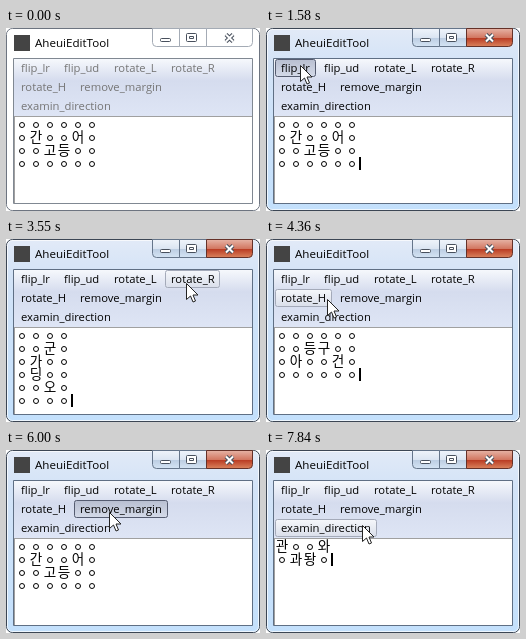
An HTML page with a canvas that plays this animation: 254 px wide and 183 px high, repeating every 7.94 s.

```html
<!DOCTYPE html>
<html lang="ko">
<head>
<meta charset="utf-8">
<title>AheuiEditTool</title>
<style>
html, body { margin: 0; width: 100%; height: 100%; overflow: hidden; background: #fff; }
canvas { display: block; }
</style>
</head>
<body>
<canvas id="stage" width="254" height="183"></canvas>
<script>
const ctx = document.getElementById('stage').getContext('2d');
const LOOP = 7940, STEP = 100, ACTIVATE = 1280, FIRST_PRESS = 1580;
const UI = '"Open Sans", "Noto Sans", sans-serif';
const MENU_FONT = `11.25px ${UI}`;

// Replaces the vowel of a Hangul syllable; single letters stay as they are.
function setVowel(ch, change) {
  const n = ch.charCodeAt(0) - 0xAC00;
  if (n < 0) return ch;
  const v = Math.floor(n / 28) % 21;
  return String.fromCharCode(0xAC00 + n + (change(v) - v) * 28);
}
const vowels = (rows, change) => rows.map(row => [...row].map(ch => setVowel(ch, change)).join(''));
const swap = (a, b) => v => v === a ? b : v === b ? a : v;

// Vowel indices: ㅏ 0, ㅓ 4, ㅗ 8, ㅘ 9, ㅜ 13, ㅡ 18, ㅣ 20
const quarter = { 0: 8, 8: 4, 4: 13, 13: 0, 18: 20, 20: 18 };
const flipLR = rows => vowels(rows.map(row => [...row].reverse().join('')), swap(0, 4));
const flipUD = rows => vowels([...rows].reverse(), swap(8, 13));
const rotateL = rows => vowels(
  [...rows[0]].map((_, c) => rows.map(row => row[c]).join('')).reverse(), v => quarter[v] ?? v);
const rotateR = rows => rotateL(rotateL(rotateL(rows)));
const rotateH = rows => flipUD(flipLR(rows));
const removeMargin = rows => rows.slice(1, -1).map(row => row.slice(1, -1));
const examine = rows => vowels(rows, () => 9);

const blank = 'ㅇㅇㅇㅇㅇㅇ';
const start = [blank, 'ㅇ간ㅇㅇ어ㅇ', 'ㅇㅇ고등ㅇㅇ', blank];

// Buttons in the order they are clicked; aim is the pointer tip.
const buttons = [
  { label: 'flip_lr', edit: flipLR, press: FIRST_PRESS, aim: [34, 37] },
  { label: 'flip_ud', edit: flipUD, press: 2470, aim: [74, 39] },
  { label: 'rotate_L', edit: rotateL, press: 3350, aim: [109, 38] },
  { label: 'rotate_R', edit: rotateR, press: 4160, aim: [190, 45] },
  { label: 'rotate_H', edit: rotateH, press: 5030, aim: [43, 62] },
  { label: 'remove_margin', edit: removeMargin, press: 6000, aim: [103, 62] },
  { label: 'examin_direction', edit: examine, press: 6900, aim: [96, 75] }
];

function layOut() {
  ctx.font = MENU_FONT;
  let x = 15, top = 31;
  for (const b of buttons) {
    const w = ctx.measureText(b.label).width;
    if (x + w > 246) { x = 15; top += 19; }
    Object.assign(b, { x: Math.round(x), top, left: Math.round(x) - 6, right: Math.round(x + w + 6) });
    x += w + 14.3;
  }
}

function pointerAt(t) {
  let x = -14, y = 42;
  const glide = (from, [toX, toY]) => {
    const k = Math.min(4, Math.max(0, Math.floor((t - from) / STEP) + 1)) / 4;
    const e = 1 - (1 - k) ** 3;
    x += (toX - x) * e;
    y += (toY - y) * e;
  };
  glide(640, [8, 44]);
  buttons.forEach((b, i) => glide(i ? buttons[i - 1].press + STEP : 980, b.aim));
  return [Math.round(x), Math.round(y)];
}

function fade(y0, y1, ...stops) {
  const g = ctx.createLinearGradient(0, y0, 0, y1);
  for (const [at, color] of stops) g.addColorStop(at, color);
  return g;
}

function box(x, y, w, h, r, fill, stroke) {
  ctx.beginPath();
  ctx.roundRect(x + .5, y + .5, w - 1, h - 1, r);
  if (fill) { ctx.fillStyle = fill; ctx.fill(); }
  if (stroke) { ctx.strokeStyle = stroke; ctx.lineWidth = 1; ctx.stroke(); }
}

function write(str, x, y, font, color) {
  ctx.font = font;
  ctx.textAlign = 'left';
  ctx.fillStyle = color;
  ctx.fillText(str, x, y);
}

function drawCross(color, width) {
  ctx.strokeStyle = color;
  ctx.lineWidth = width;
  ctx.beginPath();
  for (const d of [-3.5, 3.5]) {
    ctx.moveTo(223.5 - d, 6.5);
    ctx.lineTo(223.5 + d, 13.5);
  }
  ctx.stroke();
}

function drawFrame(active) {
  ctx.fillStyle = '#fff';
  ctx.fillRect(0, 0, 254, 183);
  box(0, 0, 254, 183, 6,
    active ? fade(0, 183, [0, '#e2eaf7'], [.2, '#d3e3f7'], [1, '#c3e0fc']) : '#fff',
    active ? '#3c4654' : '#6d7480');
  box(1, 1, 252, 181, 5, null, 'rgba(255,255,255,.7)');

  ctx.fillStyle = '#444';
  ctx.fillRect(8, 7, 16, 16);
  write('AheuiEditTool', 29, 19, `11.6px ${UI}`, '#000');

  const edge = active ? '#65758a' : '#a4abb5';
  const glass = active
    ? fade(1, 19, [0, '#eef3fa'], [.48, '#dbe5f2'], [.5, '#bccde2'], [1, '#d6e5f5'])
    : '#fff';
  const red = fade(1, 19, [0, '#e5b0a2'], [.48, '#d27761'], [.5, '#b93a22'], [1, '#dc8760']);
  box(146, 0, 28, 19, [0, 0, 0, 4], glass, edge);
  box(173, 0, 28, 19, 0, glass, edge);
  box(200, 0, 47, 19, [0, 0, 4, 0], active ? red : glass, active ? '#653128' : edge);

  const ink = '#48505d';
  box(154, 10, 11, 4, 1, '#fff', ink);
  box(180, 5, 11, 9, 1, '#fff', ink);
  box(183, 8, 5, 3, 0, null, ink);
  drawCross(ink, 4);
  drawCross('#fff', 2);
}

function drawMenu(active, x, y, pressed) {
  box(7, 30, 240, 146, 0, '#fff', active ? '#5f6f84' : '#808892');
  ctx.fillStyle = fade(31, 88, [0, '#f6f8fc'], [.38, '#d5dcee'], [1, '#dee5f5']);
  ctx.fillRect(8, 31, 238, 57);
  for (const b of buttons) {
    if (active && x >= b.left && x < b.right && y >= b.top && y < b.top + 19) {
      const [light, dark, edge] = pressed ? ['#b7bed0', '#d5dbe9', '#555c70']
                                          : ['#f6f8fb', '#d9deea', '#a4aab9'];
      box(b.left, b.top, b.right - b.left, 18, 2, fade(b.top, b.top + 18, [0, light], [1, dark]), edge);
    }
    write(b.label, b.x, b.top + 13, MENU_FONT, active ? '#000' : '#757575');
  }
}

function drawText(rows, caret) {
  ctx.fillStyle = '#fff';
  ctx.fillRect(8, 88, 238, 87);
  ctx.fillStyle = '#a0a0a0';
  ctx.fillRect(8, 88, 238, 1);
  ctx.fillRect(8, 88, 1, 87);
  ctx.font = '13.6px "Noto Sans CJK KR", "Noto Sans CJK", sans-serif';
  ctx.textAlign = 'center';
  ctx.fillStyle = ctx.strokeStyle = '#000';
  ctx.lineWidth = 1;
  rows.forEach((row, r) => [...row].forEach((ch, c) => {
    const x = 16 + 14 * c, y = 97 + 13 * r;
    if (ch === 'ㅇ') {
      ctx.beginPath();
      ctx.arc(x, y, 2.5, 0, 7);
      ctx.stroke();
    } else ctx.fillText(ch, x, y + 4);
  }));
  if (caret) ctx.fillRect(9 + 14 * rows[0].length, 77 + 13 * rows.length, 2, 13);
}

function drawPointer(x, y) {
  const arrow = [[0, 0], [0, 16], [4, 12.5], [6.5, 18.5], [9, 17.5], [6.5, 11.5], [11.5, 11.5]];
  ctx.beginPath();
  arrow.forEach(([dx, dy]) => ctx.lineTo(x + dx + .5, y + dy + .5));
  ctx.closePath();
  ctx.fillStyle = '#fff';
  ctx.strokeStyle = '#222';
  ctx.lineWidth = 1;
  ctx.fill();
  ctx.stroke();
}

function draw(t) {
  const active = t >= ACTIVATE;
  const [x, y] = pointerAt(t);
  const pressed = buttons.some(b => t >= b.press && t < b.press + STEP);
  const rows = buttons.filter(b => t >= b.press + STEP).reduce((text, b) => b.edit(text), start);
  const caret = active && (t - FIRST_PRESS) % 894 < 590;
  drawFrame(active);
  drawMenu(active, x, y, pressed);
  drawText(rows, caret);
  drawPointer(x, y);
}

function tick() {
  draw(performance.now() % LOOP);
  requestAnimationFrame(tick);
}
layOut();
tick();
</script>
</body>
</html>
```
